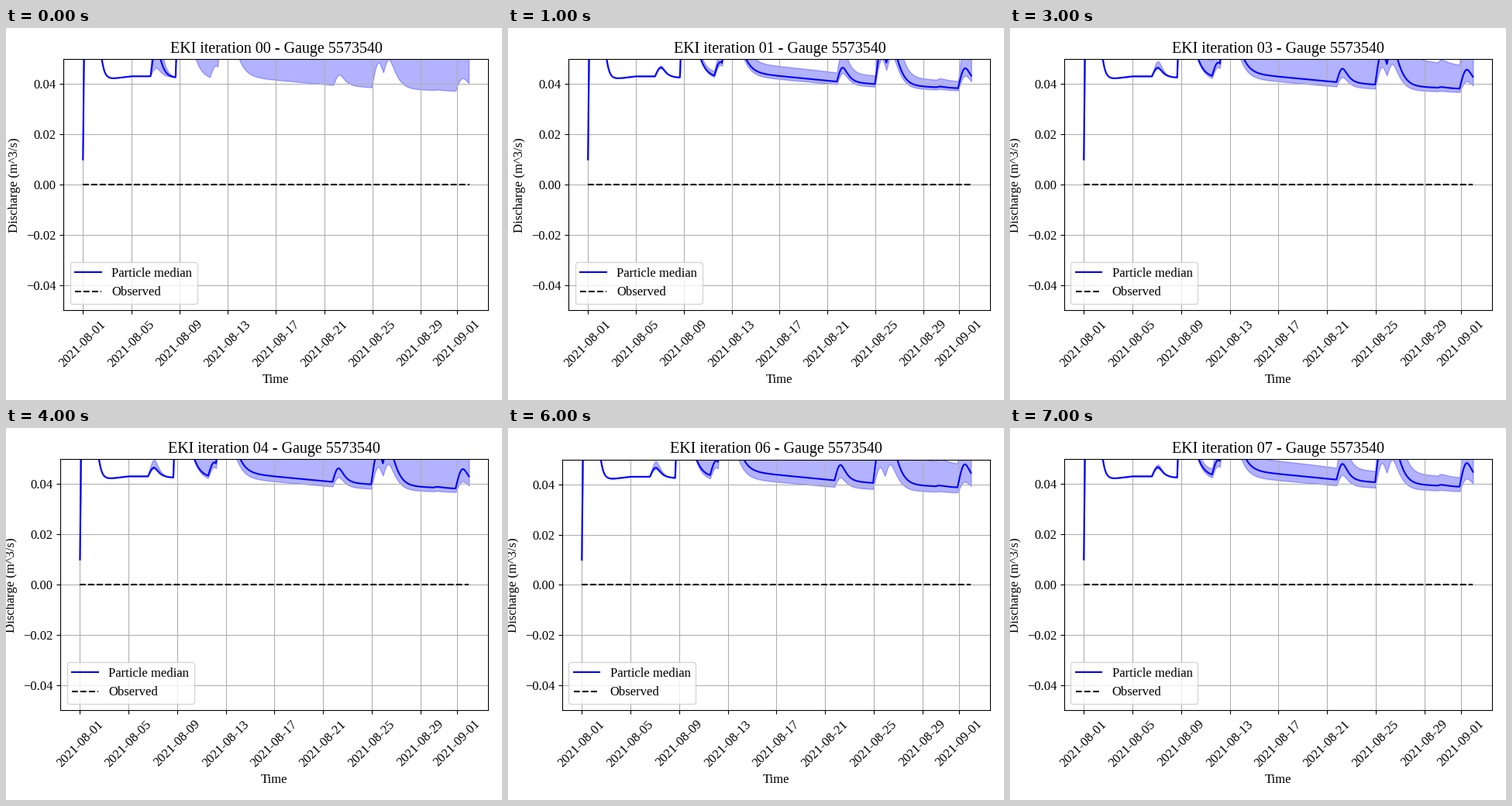
A matplotlib script that plays this animation: 640x480 px, repeating every 8000 ms.

```python
import matplotlib.pyplot as plt
import numpy as np
from matplotlib.animation import FuncAnimation

W, H, DPI = 640, 480, 100
plt.rcParams.update({"font.family": "Liberation Serif", "font.size": 12})

DAYS = 32
t = np.linspace(0, DAYS, DAYS * 48 + 1)
TICKS = [*range(0, 29, 4), 31]
DATES = [f"2021-{8 + d // 31:02d}-{d % 31 + 1:02d}" for d in TICKS]

# Base flow as (day, 1e-3 m^3/s)
BASE = [(0, 10), (.1, 40), (2.2, 42), (4, 43.1), (5.6, 43.1), (8, 42.5),
        (10.5, 42.5), (13, 44.6), (16, 43.2), (20.8, 41), (24, 40),
        (27, 39.2), (32, 38.1)]

# Rain events: start day, days of rise, decay scale, height
RAIN = [(0, .8, .2, 81), (5.6, .5, .24, 3.6), (7.68, .4, .43, 41),
        (10.55, .5, .3, 5.5), (11.2, .6, .44, 32), (20.78, .5, .29, 5.7),
        (23.96, .58, .29, 14), (24.92, .5, .38, 13.5), (29.1, .3, .3, .35),
        (30.9, .6, .4, 8.1)]


def flood(start, rise, scale, height):
    """Quick sine rise, then a rounded recession."""
    u = t - start
    up = np.sin(np.pi / 2 * np.clip(u / rise, 0, 1))
    v = np.maximum(u - rise, 0) / scale
    return height * up * (1 + v) * np.exp(-v)


flow = np.interp(t, *zip(*BASE)) + sum(flood(*r) for r in RAIN)

# Where the ensemble spreads: a little at the small early flood, then ever more
growth = np.clip((t - 8) / 4, 0, 1) * (.1 + .029 * t)
spread = growth * (flow - 35) + .25 * flood(*RAIN[1])

# Per iteration: axes left and top in px, spread of median, upper, lower
STEPS = [
    (74.4, 39.95, 9, 24, -.36),
    (78.4, 39.95, 0, .85, -.26),
    (70.1, 39.95, -.06, 2.5, -.46),
    (70.1, 39.95, -.05, 2.8, -.46),
    (70.3, 39.95, -.03, 3.5, -.46),
    (70.1, 39.95, .06, 3.2, -.46),
    (70.1, 40.52, .15, 3.0, -.46),
    (70.1, 39.95, .18, 1.3, -.36),
]
RIGHT, BOTTOM = 622.48, 364.45

fig = plt.figure(figsize=(W / DPI, H / DPI), dpi=DPI)
ax = fig.add_axes([.1, .2, .8, .7])


def draw(n):
    left, top, *gains = STEPS[n]
    med, up, low = [(flow + g * spread) / 1e3 for g in gains]
    ax.clear()
    ax.set_position([left / W, 1 - BOTTOM / H,
                     (RIGHT - left) / W, (BOTTOM - top) / H])
    ax.plot(t, med, "b", label="Particle median")
    ax.fill_between(t, low, up, color="b", alpha=.3)
    ax.plot([0, DAYS], [0, 0], "k--", label="Observed")
    ax.set_xlim(-.05 * DAYS, 1.05 * DAYS)
    ax.set_ylim(-.05, .05)
    ax.set_xticks(TICKS, DATES, rotation=45)
    ax.set_yticks([-.04, -.02, 0, .02, .04])
    ax.set_xlabel("Time")
    ax.set_ylabel("Discharge (m^3/s)", labelpad=5)
    ax.set_title(f"EKI iteration {n:02d} - Gauge 5573540")
    ax.grid(True)
    ax.legend(loc="lower left")
    return []


anim = FuncAnimation(fig, draw, frames=len(STEPS), interval=1000,
                     repeat=True, repeat_delay=0)
plt.show()
```
